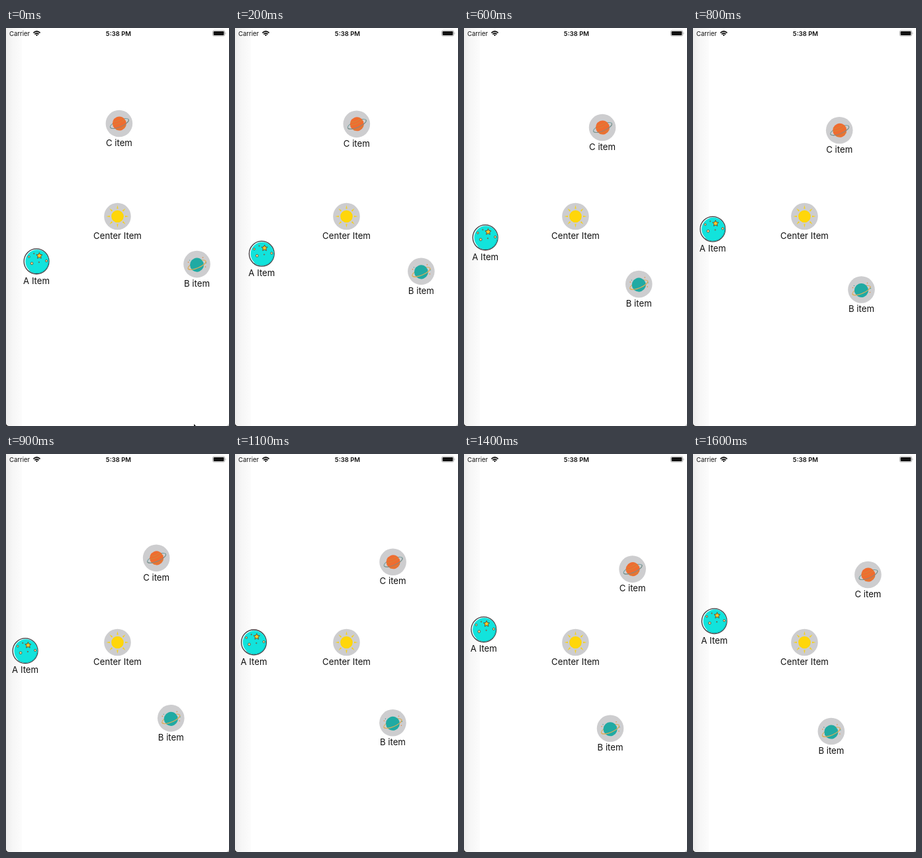
An HTML page for the animation above (1700 ms loop, 337 by 600 pixels).

```html
<!DOCTYPE html>
<html lang="en">
<head>
<meta charset="utf-8">
<title>Orbit menu</title>
<style>
  html, body { margin: 0; width: 100%; height: 100%; overflow: hidden; background: #fff; }
  svg { display: block; width: 337px; height: 600px; }
  text { font: 13.2px Inter, Roboto, sans-serif; fill: #111; text-anchor: middle; }
  .status { font-size: 9.5px; }
  .clock { font-weight: 600; }
  .line { fill: none; stroke-linecap: round; }
</style>
</head>
<body>
<svg viewBox="0 0 337 600">
  <defs>
    <linearGradient id="edge">
      <stop offset="0" stop-color="#ececec"/>
      <stop offset=".4" stop-color="#f6f6f6"/>
      <stop offset="1" stop-color="#fcfcfc"/>
    </linearGradient>
  </defs>
  <rect width="24" height="600" fill="url(#edge)"/>
  <path d="M0 596Q.5 599.5 4 600H0z" fill="#222"/>
  <path d="M337 596Q336.500 599.500 333 600H337z" fill="#bbb"/>

  <text class="status" x="5" y="12" style="text-anchor:start">Carrier</text>
  <g class="line" stroke="#111" stroke-width="1.8" style="stroke-linecap:butt">
    <path d="M41.400 7.300Q46.500 2.700 51.600 7.300M43.300 9.400Q46.500 6.600 49.700 9.400"/>
  </g>
  <path d="M44.800 10.400Q46.500 9.200 48.200 10.400L46.500 12.200z" fill="#111"/>
  <text class="status clock" x="170" y="12">5:38 PM</text>
  <rect x="312.400" y="3.900" width="18.200" height="8.200" rx="2.200" fill="none" stroke="#999" stroke-width=".8"/>
  <rect x="313.600" y="5.100" width="15.800" height="5.800" rx="1.200" fill="#111"/>
  <path d="M331.700 6.500q1.600 1.500 0 3z" fill="#999"/>

  <g transform="translate(168.500 284)">
    <circle r="20.300" fill="#cdcdcf"/>
    <circle r="9.300" fill="#ffd60a"/>
    <g id="rays" fill="#f7d21c"></g>
    <text y="33.700">Center Item</text>
  </g>

  <g class="item">
    <circle r="19.800" fill="#e4e4e4"/>
    <circle r="18.900" fill="#f4ffff" stroke="#403c40" stroke-width="1.300"/>
    <circle cx=".9" cy=".1" r="17.700" fill="#12e3dc"/>
    <path class="line" d="M-11 14A18 18 0 0 0 18 -2" stroke="#0eb9b8"/>
    <path id="star" fill="#ffc928" stroke="#5a4630" stroke-width=".9" stroke-linejoin="round"/>
    <g fill="#ffd98a" stroke="#5a4630" stroke-width=".8">
      <circle cx="-7" cy="3" r="1.900"/>
      <circle cx="-11.300" cy="-7" r="1.400"/>
      <circle cx="15" cy="-.8" r="1.600"/>
      <circle cx="3.800" cy="1.200" r=".7"/>
      <circle cx="-3.800" cy="-11.800" r=".7"/>
    </g>
    <text y="33.700">A Item</text>
  </g>

  <g class="item">
    <circle r="20.300" fill="#cdcdcf"/>
    <g transform="translate(0 1) rotate(-23)">
      <ellipse class="line" rx="14.500" ry="4.800" stroke="#dcae5c" stroke-width="1.100"/>
      <circle r="10.500" fill="#20aaa3"/>
      <path class="line" d="M-14.500 0A14.500 4.800 0 0 0 14.500 0" stroke="#dcae5c" stroke-width="1.200"/>
    </g>
    <g fill="#e88a3c">
      <circle cx="-13" cy="-3" r=".8"/><circle cx="9" cy="-10" r=".8"/>
      <circle cx="13" cy="4" r=".8"/>
    </g>
    <g fill="#3f9f9c">
      <circle cx="-11" cy="-6" r=".7"/><circle cx="14" cy="-2" r=".7"/>
    </g>
    <text y="33.700">B item</text>
  </g>

  <g class="item">
    <circle r="20.300" fill="#cdcdcf"/>
    <g transform="translate(.5 0) rotate(-23)">
      <ellipse class="line" rx="15" ry="5" stroke="#6f9c9e"/>
      <circle r="10.500" fill="#ef6c30"/>
      <path class="line" d="M-7 -6Q0 -3 7 -6M-9.500 -2.500Q0 1 9.500 -2.500M-7.500 6.800Q0 9 7 6.800" stroke="#d18a3c" stroke-width=".9"/>
      <path class="line" d="M-15 0A15 5 0 0 0 15 0" stroke="#7c8f88"/>
    </g>
    <text y="33.700">C item</text>
  </g>

  <path id="pointer" d="M284 597v3h3z" fill="#111"/>
</svg>
<script>
  const LOOP = 1700, STEP = 100, RADIUS = 140;
  const CENTER = { x: 168.5, y: 284 };
  const START = { A: 241, B: 121, C: 1 };   // degrees clockwise from the top
  const SPEED = 0.0264;                     // degrees per ms

  const polar = (radius, degrees) => {
    const a = degrees * Math.PI / 180;
    return [radius * Math.sin(a), -radius * Math.cos(a)];
  };

  document.getElementById('rays').innerHTML = Array.from({ length: 8 }, (_, i) =>
    `<path d="M-1.200 -11.500L0 -17L1.200 -11.500z" transform="rotate(${i * 45})"/>`).join('');

  const starPoints = Array.from({ length: 10 }, (_, i) => {
    const [x, y] = polar(i % 2 ? 2.3 : 4.8, i * 36);
    return [x + 4.3, y - 8.5];
  });
  document.getElementById('star').setAttribute('d', `M${starPoints.join('L')}z`);

  const items = [...document.querySelectorAll('.item')];
  const pointer = document.getElementById('pointer');

  function draw() {
    const time = Math.floor(performance.now() % LOOP / STEP) * STEP;
    Object.values(START).forEach((start, i) => {
      const [x, y] = polar(RADIUS, start + SPEED * time);
      items[i].setAttribute('transform', `translate(${CENTER.x + x} ${CENTER.y + y})`);
    });
    pointer.style.display = time < STEP ? '' : 'none';
    requestAnimationFrame(draw);
  }
  draw();
</script>
</body>
</html>
```
